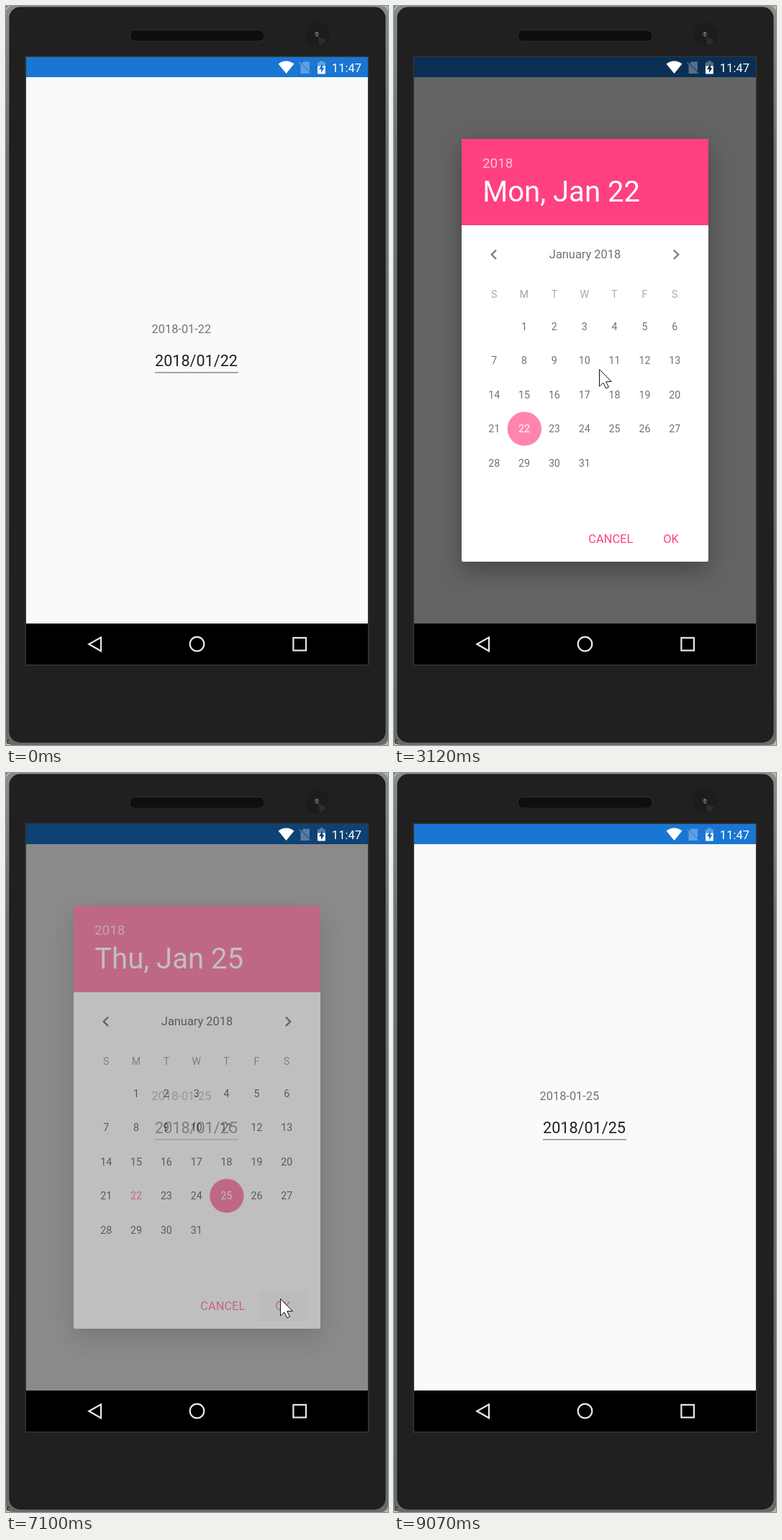
An HTML page with a canvas for the animation above (9.86 s loop, 531 by 1028 pixels).

```html
<!DOCTYPE html>
<html lang="en">
<head>
<meta charset="utf-8">
<title>Date picker</title>
<style>
html, body { margin: 0; width: 100%; height: 100%; overflow: hidden; background: #202020; }
canvas { display: block; width: 531px; height: 1028px; }
</style>
</head>
<body>
<canvas id="stage" width="531" height="1028"></canvas>
<script>
const W = 531, H = 1028, LOOP = 9860;
const PINK = '#ff4081', INK = '#212121';
const ctx = document.getElementById('stage').getContext('2d');
const layer = document.createElement('canvas');
layer.width = W;
layer.height = H;
const dlg = layer.getContext('2d');

function rect(c, x, y, w, h, fill) {
  c.fillStyle = fill;
  c.fillRect(x, y, w, h);
}

function round(c, x, y, w, h, r, fill) {
  c.beginPath();
  c.roundRect(x, y, w, h, r);
  c.fillStyle = fill;
  c.fill();
}

function disc(c, x, y, r, fill) {
  c.beginPath();
  c.arc(x, y, r, 0, Math.PI * 2);
  c.fillStyle = fill;
  c.fill();
}

function path(c, pts, closed) {
  c.beginPath();
  pts.forEach(([x, y]) => c.lineTo(x, y));
  if (closed) c.closePath();
}

function poly(c, pts, fill) {
  path(c, pts, true);
  c.fillStyle = fill;
  c.fill();
}

function line(c, pts, color, width, closed) {
  path(c, pts, closed);
  c.strokeStyle = color;
  c.lineWidth = width;
  c.stroke();
}

function text(c, str, x, y, size, color, align = 'left') {
  c.font = `${size}px Roboto, sans-serif`;
  c.textAlign = align;
  c.fillStyle = color;
  c.fillText(str, x, y);
}

// Progress 0..1 in n held steps; the first step lands at t0, the last at t1
function stepped(t, t0, t1, n) {
  if (t < t0) return 0;
  return Math.min(1, (1 + Math.floor((t - t0) / (t1 - t0) * (n - 1) + 1e-6)) / n);
}

const easeOut = p => 1 - (1 - p) ** 3;
const easeBoth = p => p * p * (3 - 2 * p);

// Mouse trips, each going on from the end of the one before
const entry = { x: 478, y: 1158 };
const trips = [
  { from: 250, to: 730, steps: 7, x: 321, y: 666, ease: easeOut },
  { from: 950, to: 1340, steps: 6, x: 282, y: 509, ease: easeBoth },
  { from: 1750, to: 1830, steps: 2, x: 285, y: 505, ease: easeBoth },
  { from: 3810, to: 4110, steps: 5, x: 271, y: 550, ease: easeBoth },
  { from: 4190, to: 4480, steps: 4, x: 301, y: 585, ease: easeOut },
  { from: 5780, to: 6310, steps: 8, x: 381, y: 731, ease: easeOut },
  { from: 8340, to: 9070, steps: 10, x: 508, y: 1034, ease: easeBoth }
];

function cursorAt(t) {
  let { x, y } = entry;
  for (const trip of trips) {
    const p = trip.ease(stepped(t, trip.from, trip.to, trip.steps));
    x += (trip.x - x) * p;
    y += (trip.y - y) * p;
  }
  return [Math.round(x), Math.round(y)];
}

function drawPhone() {
  const g = ctx.createLinearGradient(0, 0, 0, H);
  g.addColorStop(0, '#858c8a');
  g.addColorStop(.2, '#6b7270');
  g.addColorStop(1, '#656b69');
  rect(ctx, 0, 0, W, H, '#b4b9b8');
  round(ctx, 0, 0, W, H, 9, g);
  round(ctx, 4.5, 1.5, 523, 1023, 15, '#151515');
  round(ctx, 5.5, 2.5, 521, 1021, 14, '#202020');
  rect(ctx, 0, 0, 2, 2, '#3f87c4');
  line(ctx, [[5, 1021.5], [1.5, 1021.5], [1.5, 1025.5], [5, 1025.5]], '#222', 1);

  round(ctx, 172, 33, 187.5, 16.5, 7, '#2b2b2b');
  round(ctx, 173, 34, 185.5, 14.5, 6, '#0e0e0e');
  disc(ctx, 432.5, 39.5, 17, '#1c1c1f');
  poly(ctx, [[434, 43], [445, 47], [442, 52], [436, 55]], '#2d2d2f');
  disc(ctx, 432, 39, 3.5, '#3b3b3c');
  disc(ctx, 432, 37.5, 1.2, '#8c8c8c');
  disc(ctx, 432.5, 41.5, 1.2, '#777');
  rect(ctx, 26.5, 69.5, 478, 848, '#343434');
}

function drawStatus(bar) {
  ctx.beginPath();
  ctx.moveTo(389.5, 94);
  ctx.lineTo(378.5, 80.5);
  ctx.quadraticCurveTo(389.5, 72.5, 400.5, 80.5);
  ctx.closePath();
  ctx.fillStyle = '#fff';
  ctx.fill();

  const dim = 'rgba(255,255,255,.31)';
  poly(ctx, [[413.5, 77.5], [422, 77.5], [422, 91], [411, 80]], dim);
  poly(ctx, [[409.5, 81.5], [421, 93], [419.5, 94], [409.5, 94]], dim);
  line(ctx, [[407.5, 78.5], [423, 94]], dim, 1.5);

  rect(ctx, 436, 76.5, 5, 2, dim);
  rect(ctx, 433, 78.5, 11, 5, dim);
  round(ctx, 433, 83.5, 11, 11, [0, 0, 1, 1], '#fff');
  poly(ctx, [[440, 80.5], [435, 88], [438, 88], [438, 93], [442.5, 86], [440, 86]], bar);
  text(ctx, '11:47', 452.8, 91.6, 16.6, '#fff');
}

function drawNav() {
  rect(ctx, 28, 859, 475, 57, '#000');
  line(ctx, [[132, 878.3], [132, 897.3], [115.3, 887.8]], '#e8e8e8', 2.2, true);
  ctx.beginPath();
  ctx.arc(265.5, 887.5, 9.8, 0, Math.PI * 2);
  ctx.stroke();
  ctx.strokeRect(399.4, 878.9, 17.6, 17.6);
}

function drawPage(t, day) {
  rect(ctx, 28, 99, 475, 760, '#fafafa');
  text(ctx, `2018-01-${day}`, 202.5, 454.8, 16.4, '#737373');
  text(ctx, `2018/01/${day}`, 207, 501.3, 21.6, INK);
  rect(ctx, 207, 509.3, 116, 1.3, '#7c7c7c');
  if (t < 3180) {
    ctx.globalAlpha = stepped(t, 2600, 2730, 2);
    rect(ctx, 207, 509, 116, 2.4, PINK);
    ctx.globalAlpha = 1;
  }
}

function drawMonth(t, picked) {
  const c = dlg, midX = 265.5, colX = i => midX + (i - 3) * 41.85;
  for (const side of [-1, 1]) {
    const x = midX + side * 126.5;
    line(c, [[x - side * 3, 339.5], [x + side * 3.2, 345.7], [x - side * 3, 351.9]], '#333', 2.3);
  }
  text(c, 'January 2018', midX, 351.3, 16.4, INK, 'center');
  [...'SMTWTFS'].forEach((d, i) => text(c, d, colX(i) - .8, 405.5, 14.1, '#767676', 'center'));
  for (let d = 1; d <= 31; d++) {
    const x = colX(d % 7) - .8, y = 446 + Math.floor(d / 7) * 47.45;
    const on = d === picked;
    if (on) disc(c, x + .3, y - .2, 23.7, PINK);
    else if (d === 25 && t >= 5140) disc(c, x + .3, y - .2, 23.7, 'rgba(0,0,0,.12)');
    text(c, d, x, y + 4.9, 14.2, on ? '#fff' : d === 22 ? PINK : INK, 'center');
  }
}

function drawDialog(t, opening, picked) {
  const c = dlg;
  c.clearRect(0, 0, W, H);
  c.save();
  c.shadowColor = 'rgba(0,0,0,.31)';
  c.shadowBlur = 34;
  c.shadowOffsetY = 12;
  round(c, 94, 185, 343, 588, 2, '#fff');
  c.restore();
  round(c, 94, 185, 343, 120, [2, 2, 0, 0], PINK);
  text(c, '2018', 123, 224.5, 18.9, 'rgba(255,255,255,.7)');
  text(c, picked === 25 ? 'Thu, Jan 25' : 'Mon, Jan 22', 123.2, 272.3, 40.1, '#fff');

  drawMonth(t, picked);
  // The month shows up later than the header
  rect(c, 94, 305, 343, 400, `rgba(255,255,255,${1 - opening ** 2})`);

  if (t >= 7100) round(c, 351, 720, 67, 42, 2, 'rgba(0,0,0,.02)');
  text(c, 'CANCEL', 301.3, 747, 16.4, PINK, 'center');
  text(c, 'OK', 385, 747, 16.4, PINK, 'center');
}

const arrow = [[0, 0], [0, 23.6], [5.3, 18.6], [9.2, 26.4], [12.9, 24.7], [9.2, 17.2], [16.8, 17]];

function drawCursor([x, y]) {
  ctx.save();
  ctx.translate(x + .5, y + .5);
  ctx.lineJoin = 'round';
  poly(ctx, arrow, '#fff');
  line(ctx, arrow, '#10131c', 1, true);
  ctx.restore();
}

function draw(t) {
  const opening = stepped(t, 2900, 3180, 5);
  const closing = stepped(t, 7100, 7330, 4);
  const scrim = .6 * Math.min(1, opening * 1.25) * (1 - closing);
  const alpha = Math.min(1, opening * 1.6) * Math.max(0, 1 - closing * 2.2);
  const bar = `rgb(${[25, 118, 210].map(v => Math.round(v * (1 - scrim))).join(',')})`;

  drawPhone();
  drawPage(t, t >= 7100 ? 25 : 22);
  rect(ctx, 28, 99, 475, 760, `rgba(0,0,0,${scrim})`);
  rect(ctx, 28, 71, 475, 28, bar);
  drawStatus(bar);
  if (alpha) {
    drawDialog(t, opening, t >= 5390 ? 25 : 22);
    ctx.globalAlpha = alpha;
    ctx.drawImage(layer, 0, 0);
    ctx.globalAlpha = 1;
  }
  drawNav();
  drawCursor(cursorAt(t));
}

const start = performance.now();
function tick(now) {
  draw(Math.max(0, now - start) % LOOP);
  requestAnimationFrame(tick);
}
draw(0);
requestAnimationFrame(tick);
</script>
</body>
</html>
```
